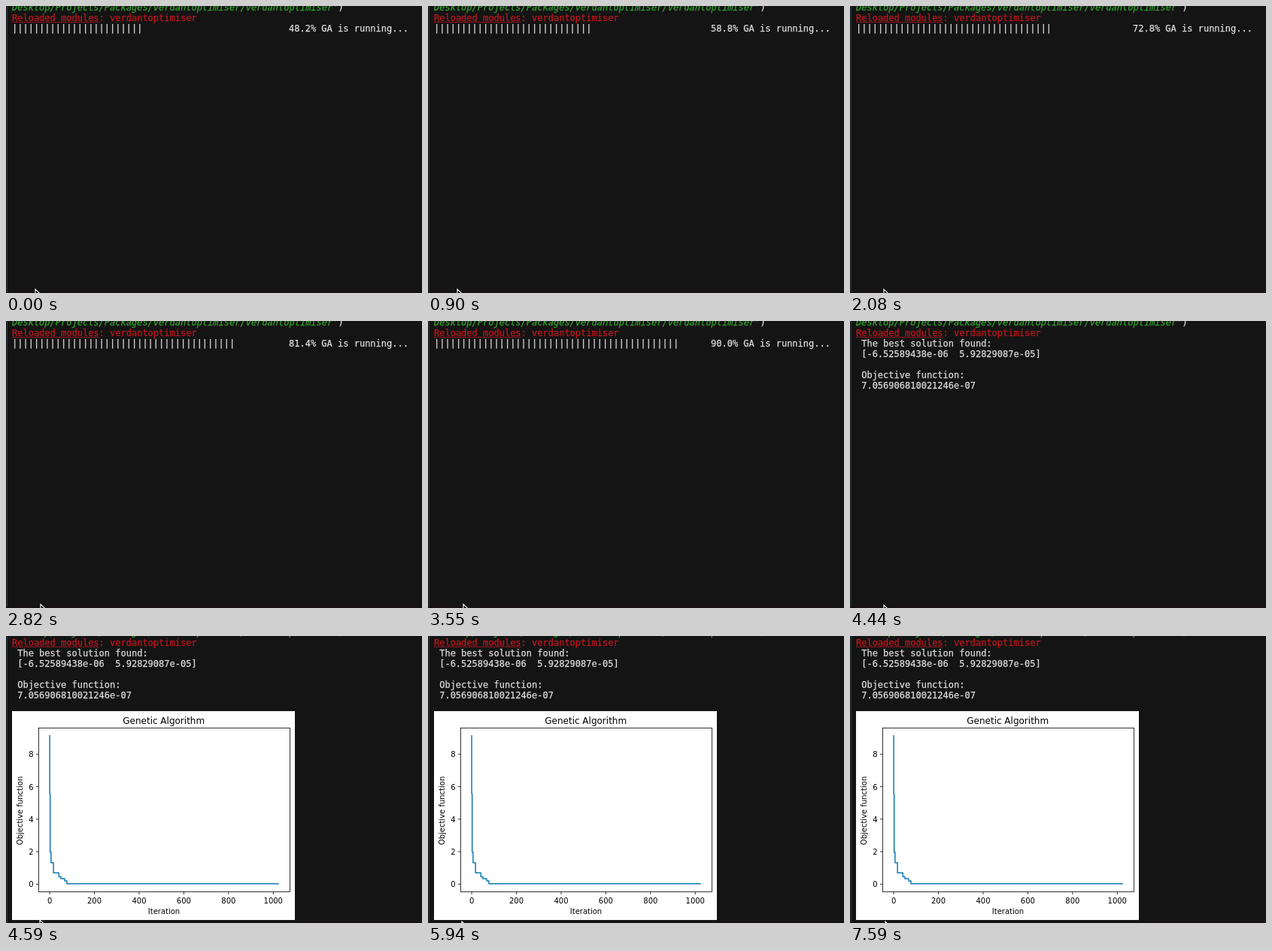
Recreate the animation shown at these times as an HTML page. Size 553 by 382 pixels, loop 8000 ms.

```html
<!DOCTYPE html>
<html lang="en">
<head>
<meta charset="utf-8">
<title>Solver console</title>
<style>
  html, body { margin: 0; width: 100%; height: 100%; overflow: hidden; background: #141414; }
  svg { display: block; width: 553px; height: 382px; }
  text { white-space: pre; }
  .mono { font: 12px "DejaVu Sans Mono", monospace; fill: #dcdcdc; stroke: #dcdcdc; stroke-width: .25; }
  .mono .path { font-style: italic; fill: #35a02f; stroke: #35a02f; }
  .mono .warn { fill: #c0161f; stroke: #c0161f; }
  .plot { font: 10px "DejaVu Sans", sans-serif; fill: #000; }
  .plot .title { font-size: 12px; }
  .mid { text-anchor: middle; }
  .end { text-anchor: end; }
  .axis { fill: none; stroke: #000; stroke-width: .8; }
</style>
</head>
<body>
<svg viewBox="0 0 553 382">
  <rect width="553" height="382" fill="#141414"/>
  <rect x="1" width="1" height="382" fill="#26394a"/>
  <rect y="381" width="553" height="1" fill="#180e13"/>
  <g id="log" class="mono">
    <text x="8" y="6"><tspan class="path">Desktop/Projects/Packages/verdantoptimiser/verdantoptimiser'</tspan>)</text>
    <text class="warn" x="8" y="20">Reloaded modules: verdantoptimiser</text>
    <rect x="8" y="21" width="115.6" height="1" fill="#8a1620" stroke="none"/>
    <g id="running">
      <text id="bar" x="8" y="34"></text>
      <text id="status" x="376" y="34"></text>
    </g>
    <g id="result">
      <text x="15.2" y="34">The best solution found:</text>
      <text x="15.2" y="48">[-6.52589438e-06  5.92829087e-05]</text>
      <text x="15.2" y="76">Objective function:</text>
      <text x="15.2" y="90">7.056906810021246e-07</text>
    </g>
  </g>
  <g id="plot" class="plot">
    <rect x="8" y="100" width="376" height="278" fill="#fff"/>
    <text class="title mid" x="209.7" y="117">Genetic Algorithm</text>
    <text class="mid" x="210" y="370">Iteration</text>
    <text class="mid" transform="translate(22 232.5) rotate(-90)">Objective function</text>
    <g id="ticks"></g>
    <path id="curve" fill="none" stroke="#1079b2" stroke-width="1.5" stroke-linejoin="round"/>
    <rect class="axis" x="43.5" y="122.5" width="334" height="218"/>
  </g>
  <path id="cursor" d="M0 0V15L3.5 11.6L6 17L8.5 16L6.2 10.7H11Z" fill="#000" stroke="#fff" stroke-width="1.1"/>
</svg>
<script>
const LOOP = 8000, STEP = 147.9, RESULT_STEP = 30, PLOT_STEP = 31;
const $ = id => document.getElementById(id);
const show = (id, on) => $(id).setAttribute("display", on ? "inline" : "none");

const plotX = iteration => 58.1 + iteration * 0.29715;
const plotY = value => 330.3 - value * 21.625;

function drawPlot() {
  let ticks = "";
  for (let n = 0; n <= 1000; n += 200) {
    const x = plotX(n);
    ticks += `<path class="axis" d="M${x} 340.5v3.5"/><text class="mid" x="${x}" y="355.5">${n}</text>`;
  }
  for (let n = 0; n <= 8; n += 2) {
    const y = plotY(n);
    ticks += `<path class="axis" d="M43.5 ${y}h-3.5"/><text class="end" x="36.5" y="${y + 4}">${n}</text>`;
  }
  $("ticks").innerHTML = ticks;

  // Best value so far: a falling staircase of [iteration, value].
  const best = [[0, 5.56], [2, 1.97], [6, 1.32], [17, .7], [41, .45], [50, .34], [67, .2], [77, .02]];
  const stairs = best.map(([n, v]) => `H${plotX(n)}V${plotY(v)}`).join("");
  $("curve").setAttribute("d", `M${plotX(0)} ${plotY(9.17)}${stairs}H${plotX(1025)}`);
}

// Pointer path: time, x, y
const pointer = [[1800, 39, 377], [2080, 45, 377], [3550, 47, 377], [4440, 45, 378], [5640, 45, 380], [7590, 47, 380]];

function pointerAt(t) {
  const next = pointer.findIndex(p => p[0] > t);
  if (next === 0) return pointer[0].slice(1);
  if (next < 0) return pointer.at(-1).slice(1);
  const a = pointer[next - 1], b = pointer[next];
  const f = (t - a[0]) / (b[0] - a[0]);
  return [1, 2].map(i => Math.round(a[i] + (b[i] - a[i]) * f));
}

function render(t) {
  const step = Math.floor(t / STEP);
  const done = step >= RESULT_STEP, plotted = step >= PLOT_STEP;
  show("running", !done);
  show("result", done);
  show("plot", plotted);
  $("log").setAttribute("transform", `translate(0 ${plotted ? -7 : 0})`);

  // Progress slows very slightly as the run goes on.
  const percent = 48.2 + 1.775 * step - 0.0014 * step * step;
  $("bar").textContent = "|".repeat(Math.round(Math.min(percent, 100) / 2));
  $("status").textContent = percent.toFixed(1) + "% GA is running...";

  const [x, y] = pointerAt(t);
  $("cursor").setAttribute("transform", `translate(${x} ${y})`);
}

drawPlot();
const start = performance.now();
function tick() {
  render((performance.now() - start) % LOOP);
  requestAnimationFrame(tick);
}
tick();
</script>
</body>
</html>
```
